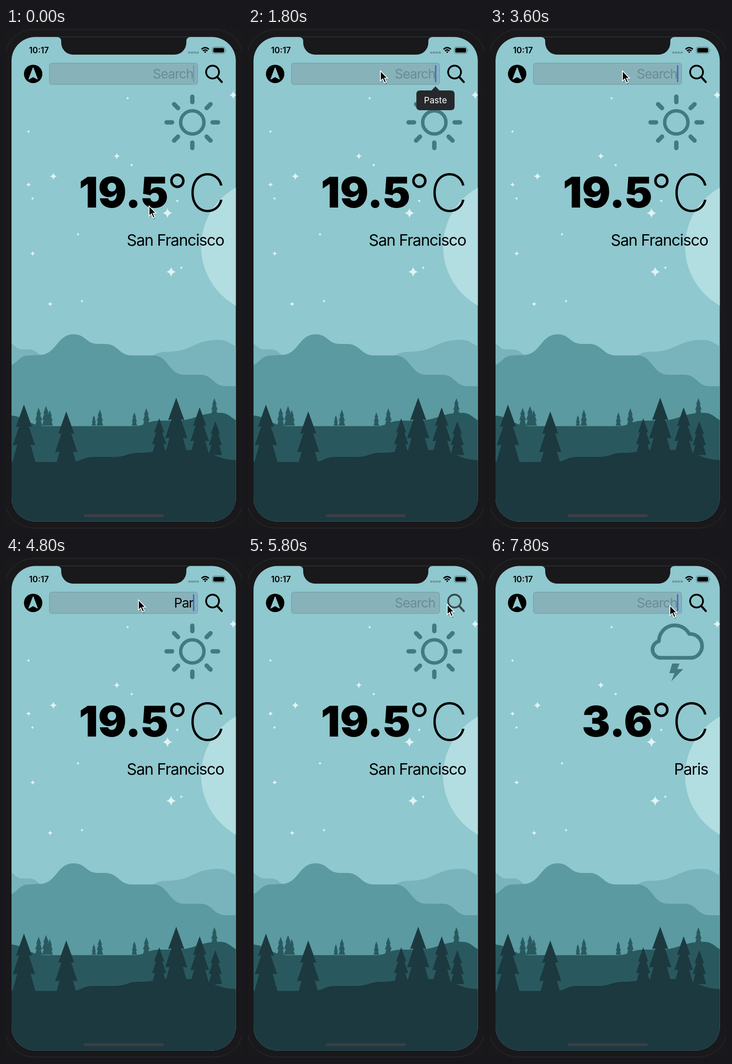
An HTML page that plays this animation: 513x1091 px, repeating every 8 s.

```html
<!DOCTYPE html>
<html lang="en">
<head>
<meta charset="utf-8">
<title>Weather search</title>
<style>
  html, body { margin: 0; width: 100%; height: 100%; overflow: hidden; background: #19181b; }
  svg { display: block; width: 513px; height: 1091px; font-family: Inter, "Open Sans", sans-serif; }
  .end { text-anchor: end; }
  #query { font-size: 28.5px; letter-spacing: -1.1px; }
  #temp { font-size: 92px; font-weight: 900; }
  #unit { font-size: 114px; font-weight: 250; }
  #degree { font-size: 99px; font-weight: 320; }
  #city { font-size: 34px; letter-spacing: -1.2px; }
</style>
</head>
<body>
<svg viewBox="0 0 513 1091">
  <defs>
    <clipPath id="screen"><rect x="12" y="19.500" width="487.500" height="1055" rx="52"/></clipPath>
    <path id="tree" d="M0 0L.7 .39 .42 .38 .97 .71 .58 .7 1 1H-1L-.58 .7 -.97 .71 -.42 .38 -.7 .39Z"/>
    <path id="star" d="M0-1Q.15-.15 1 0 .15 .15 0 1-.15 .15-1 0-.15-.15 0-1"/>
  </defs>
  <rect x="-3" y="3" width="519" height="1086" rx="64" fill="none" stroke="#302f33"/>
  <g clip-path="url(#screen)">
    <rect width="513" height="1091" fill="#8fc8ce"/>
    <circle cx="571" cy="476" r="147" fill="#b2dde1"/>
    <g id="scene"></g>
    <rect x="169" y="1059" width="174" height="6" rx="3" fill="#3d3f43"/>
    <path d="M112 19V20A8 8 0 0 1 120 28V32A26 26 0 0 0 146 58H366A26 26 0 0 0 392 32V28A8 8 0 0 1 400 20V19Z" fill="#19181b"/>
  </g>

  <text x="50" y="55" font-size="18" font-weight="600">10:17</text>
  <path d="M396 53.5h23" stroke="#000" stroke-opacity=".25" stroke-width="4" stroke-dasharray="5 1"/>
  <path d="M425 46.500Q433 39 441 46.500M428 50Q433 45.500 438 50M431.500 53Q433 52 434.500 53" fill="none" stroke="#000" stroke-width="2.800"/>
  <rect x="448.500" y="41.500" width="27.500" height="14" rx="4" fill="none" stroke="#000" stroke-opacity=".45"/>
  <rect x="450.500" y="43.500" width="23.500" height="10" rx="2.500"/>
  <path d="M477.500 46.500q2 2 0 4z" opacity=".5"/>

  <circle cx="59" cy="100" r="20"/>
  <path d="M59 87L68 111 59 106 50 111Z" fill="#8fc8ce" stroke="#8fc8ce" stroke-width="2" stroke-linejoin="round"/>
  <rect x="94.500" y="76.500" width="322" height="46.500" rx="5" fill="#7d959d" fill-opacity=".42" stroke="#6e989f"/>
  <text id="query" class="end" x="407" y="110"></text>
  <rect id="caret" x="406.500" y="81" width="2.800" height="37" rx="1" fill="#3e60dc"/>
  <g id="lens" fill="none" stroke="#000" stroke-width="3.800" stroke-linecap="round">
    <circle cx="449" cy="96" r="14"/><path d="M459.500 107L469 117.500" stroke-width="4.500"/>
  </g>

  <g id="sun" transform="translate(405 205.500)" fill="none" stroke="#437a80" stroke-width="7.500">
    <circle r="25.300"/>
  </g>
  <g id="storm" fill="#437a80">
    <path d="M368 219.500a18.500 18.500 0 0 1-1-36a35 35 0 0 1 66-16a26.300 26.300 0 0 1 7 52z" fill="none" stroke="#437a80" stroke-width="8" stroke-linejoin="round"/>
    <path d="M396 232H412L407 244H420L394 271 401 253H390Z"/>
  </g>
  <text id="temp" class="end" x="353" y="391"></text>
  <text id="degree" class="end" x="395" y="390">°</text>
  <text id="unit" class="end" x="478" y="400">C</text>
  <text id="city" class="end" x="474" y="474"></text>

  <g id="menu">
    <path d="M374 136H399L407.500 127 416 136H441Q449 136 449 144V171Q449 179 441 179H374Q366 179 366 171V144Q366 136 374 136Z" fill="#26282b"/>
    <text x="407.500" y="164" font-size="19" text-anchor="middle" fill="#fff">Paste</text>
  </g>
  <g id="pointer">
    <path d="M2 4V27L7 22 11 31 15 29 11 20H18Z" opacity=".22"/>
    <path d="M1 1.500V23.500L6 18.800 9.800 27.300 13.500 25.700 9.800 17.300H16.300Z" stroke="#fff" stroke-width="1.700"/>
  </g>
</svg>
<script>
const el = id => document.getElementById(id);
const clamp = v => Math.min(1, Math.max(0, v));
const place = (shape, color, x, y, w, h) =>
  `<use href="#${shape}" transform="translate(${x} ${y}) scale(${w} ${h})" fill="${color}"/>`;

// Terraces joined by S-curves, filled to the bottom of the stage.
function ridge(color, [first, ...rest]) {
  let [x, y] = first, d = `M${first}`;
  for (const [nx, ny] of rest) {
    const mid = (x + nx) / 2;
    d += `C${mid} ${y} ${mid} ${ny} ${nx} ${ny}`;
    [x, y] = [nx, ny];
  }
  return `<path d="${d}V1091H${first[0]}Z" fill="${color}"/>`;
}

// Every tree is five times as tall as its half width.
const trees = (color, base, ...list) =>
  list.map(([x, half]) => place('tree', color, x, base - 5 * half, half, 5 * half)).join('');

const star = (x, y, r) => place('star', '#e0f3f4', x, y, r, r);

function stars() {
  let out = star(351, 403, 11) + star(359, 531, 11) + star(494, 146, 9) + star(103, 323, 8) +
    star(241, 279, 7) + star(49, 341, 5.5) + star(58, 491, 5.5) + star(96, 601, 5.5);
  for (let i = 1; i < 9; i++) out += star(40 + 440 * (i * .755 % 1), 80 + 520 * (i * .57 % 1), 3.5);
  return out;
}

const far = '#79b4bc', near = '#5b9aa1', hill = '#29595f', front = '#1c393f';
el('scene').innerHTML = stars() +
  ridge(far, [[0, 684], [36, 700], [50, 700], [90, 718], [295, 718], [350, 705], [463, 679], [512, 694]]) +
  ridge(near, [[0, 736], [50, 713], [73, 712], [147, 667], [200, 688], [215, 688], [274, 713], [320, 713],
    [387, 755], [422, 755], [478, 780], [500, 780]]) +
  trees(hill, 866, [71, 7.8], [87, 8.6], [95, 6.8], [191, 4.6], [204, 7], [279, 5.8], [305, 7.6]) +
  trees(hill, 842, [453, 7.2]) +
  ridge(hill, [[0, 843], [90, 867], [275, 867], [335, 855], [365, 855], [465, 838], [515, 857]]) +
  trees(front, 945, [39, 25]) + trees(front, 960, [131, 25]) +
  trees(front, 930, [333, 16], [370, 25], [421, 20.8], [455, 14.8]) +
  ridge(front, [[12, 945], [140, 945], [190, 934], [235, 934], [290, 925], [360, 919], [400, 919], [505, 941]]);

for (let angle = 0; angle < 360; angle += 45)
  el('sun').innerHTML += `<path d="M44 0H56" transform="rotate(${angle})" stroke-width="9.500" stroke-linecap="round"/>`;

// Number of keys pressed by time t.
const keys = (t, start, step) => Math.max(0, Math.floor((t - start) / step) + 1);

function typed(t) {
  if (t < 3000) return 'Paui'.slice(0, keys(t, 2000, 200));
  if (t < 4200) return 'Paui'.slice(0, Math.max(0, 4 - keys(t, 3000, 200)));
  return t < 5800 ? 'Paris'.slice(0, keys(t, 4200, 250)) : '';
}

const stops = [[0, 310, 386], [800, 287, 92], [4800, 287, 92], [5400, 480, 92], [5600, 432, 102],
  [7000, 432, 102], [7600, 390, 104], [8000, 390, 104]];

function pointerAt(t) {
  const next = stops.findIndex(([time]) => time > t);
  const [t0, x0, y0] = stops[next - 1], [t1, x1, y1] = stops[next];
  const u = (t - t0) / (t1 - t0), k = u * u * (3 - 2 * u);
  return [x0 + (x1 - x0) * k, y0 + (y1 - y0) * k];
}

function draw(now) {
  const t = Math.floor(now % 8000 / 200) * 200;
  const query = typed(t), inParis = t >= 6200, editing = t < 5800 || t >= 7600;
  const show = (id, opacity) => el(id).setAttribute('opacity', opacity);
  el('query').textContent = query || 'Search';
  el('query').setAttribute('fill', query ? '#000' : '#6a8c93');
  el('temp').textContent = inParis ? '3.6' : '19.5';
  el('city').textContent = inParis ? 'Paris' : 'San Francisco';
  el('pointer').setAttribute('transform', `translate(${pointerAt(t)})`);
  show('caret', editing ? (t % 2800 ? 1 : .35) : 0);
  show('lens', t < 5600 ? 1 : clamp(.22 + (t - 5600) / 500));
  show('menu', t < 2000 ? clamp((t - 980) / 200) : 0);
  show('sun', inParis ? 0 : 1);
  show('storm', inParis ? 1 : 0);
}

const begin = performance.now();
function tick() {
  draw(performance.now() - begin);
  requestAnimationFrame(tick);
}
tick();
</script>
</body>
</html>
```
